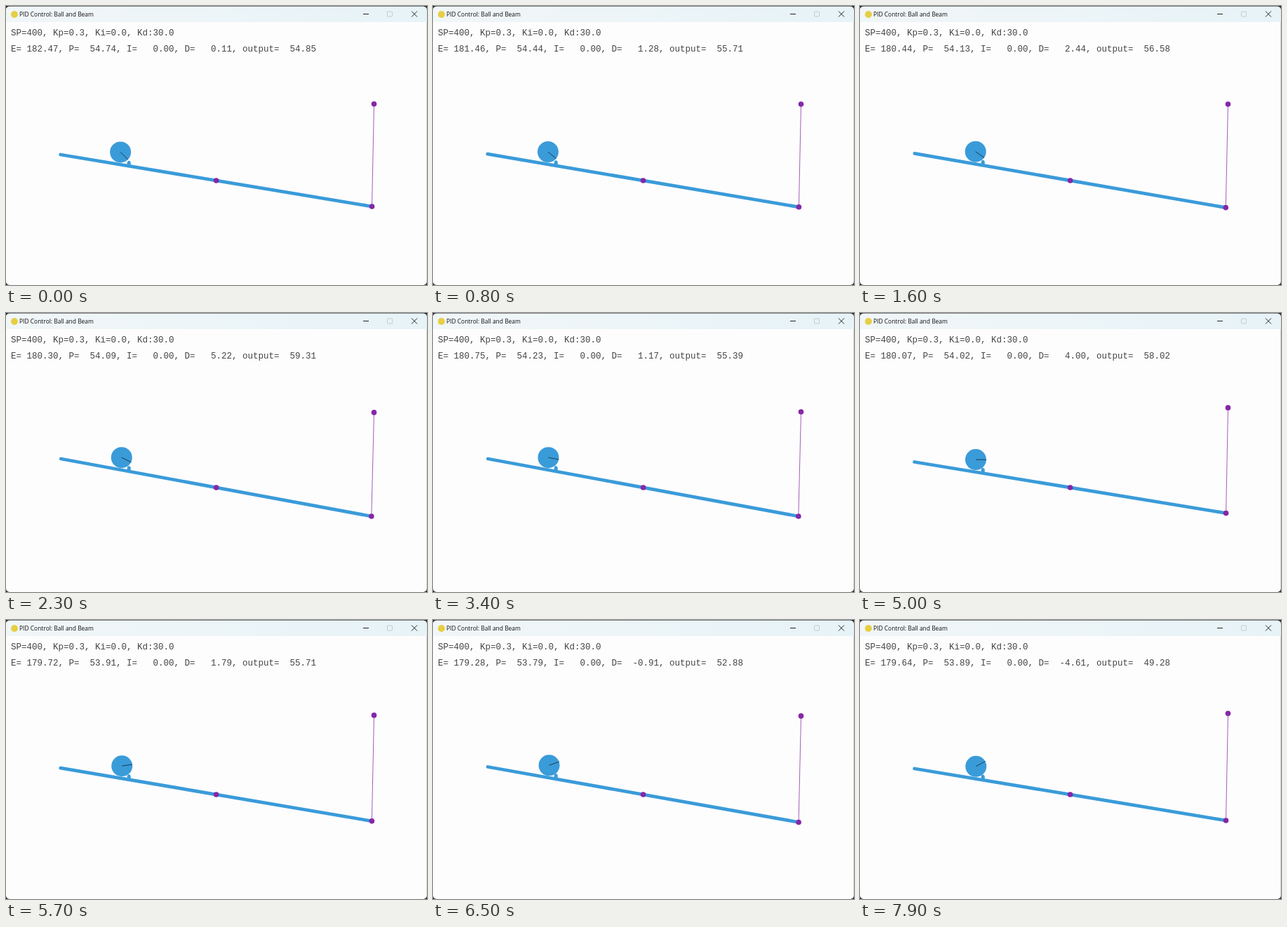
An HTML page for the animation above (8 s loop, 600 px wide and 398 px high).

```html
<!DOCTYPE html>
<html lang="en">
<head>
<meta charset="utf-8">
<title>PID Control: Ball and Beam</title>
<style>
  html, body { margin: 0; width: 100%; height: 100%; overflow: hidden; background: #2a2d2e; }
  svg { display: block; }
  .mono { font: 12.5px "Liberation Mono", monospace; fill: #444; white-space: pre; }
  .title { font: 8.45px "Open Sans", sans-serif; fill: #111; }
  .blue { fill: #3a9bd9; }
  .pin { fill: #8427a8; }
</style>
</head>
<body>
<svg width="600" height="398" viewBox="0 0 600 398">
  <defs>
    <linearGradient id="bar"><stop stop-color="#f1f6f8"/><stop offset="1" stop-color="#e7f3f7"/></linearGradient>
    <clipPath id="frame"><rect y="0.7" width="599.8" height="397.3" rx="5"/></clipPath>
  </defs>
  <g clip-path="url(#frame)">
    <rect width="600" height="398" fill="#fefdfe"/>
    <rect width="600" height="23" fill="url(#bar)"/>
  </g>
  <circle cx="12" cy="12" r="5" fill="#e6cf45"/>
  <text class="title" x="19" y="15.3">PID Control: Ball and Beam</text>
  <g fill="none" stroke="#222">
    <path d="M509 11.5h8M578 7.5l8 8m0-8l-8 8"/>
    <rect x="543.5" y="8" width="7" height="7" rx="1" stroke="#c3cbce"/>
  </g>
  <text class="mono" x="7" y="42">SP=400, Kp=0.3, Ki=0.0, Kd:30.0</text>
  <text class="mono" x="7" y="64.5" id="readout"></text>
  <line id="beam" stroke="#3a9bd9" stroke-width="4.8" stroke-linecap="round"/>
  <ellipse class="blue" id="stop" cx="175.2" rx="2.6" ry="4.2"/>
  <circle class="blue" id="ball" r="15"/>
  <line id="spoke" stroke="#1d3b50"/>
  <line id="rod" stroke="#a05fb8"/>
  <circle class="pin" cx="299.6" cy="249" r="3.8"/>
  <circle class="pin" id="tip" r="3.8"/>
  <circle class="pin" id="crank" cx="524.5" r="3.8"/>
</svg>
<script>
const LOOP = 8, STEPS_PER_SECOND = 10;
const SETPOINT = 400, KP = 0.3, SCALE = 0.75;
const PIVOT = { x: 299.6, y: 249 }, HALF = 225, CRANK_X = 524.5, RADIUS = 15;

// key poses: seconds, error, derivative term, height of the beam's right end
const poses = [
  [0, 182.47, 0.11, 286],
  [1.6, 180.443, 2.443, 287.6],
  [2.3, 180.3, 5.22, 290],
  [3.4, 180.752, 1.166, 290],
  [5, 180.07, 4, 285.5],
  [6.5, 179.284, -0.91, 288.5],
  [7.9, 179.64, -4.61, 286]
];

const set = (id, attrs) => {
  const el = document.getElementById(id);
  for (const name in attrs) el.setAttribute(name, attrs[name]);
};
const num = v => v.toFixed(2).padStart(7);

function poseAt(t) {
  const i = Math.max(1, poses.findIndex(pose => pose[0] >= t));
  const a = poses[i - 1], b = poses[i];
  const u = (t - a[0]) / (b[0] - a[0]), ease = u * u * (3 - 2 * u);
  return a.map((v, j) => v + (b[j] - v) * ease).slice(1);
}

function draw(t) {
  const [error, d, tipY] = poseAt(t);
  const p = KP * error;
  document.getElementById("readout").textContent =
    `E=${num(error)}, P=${num(p)}, I=${num(0)}, D=${num(d)}, output=${num(p + d)}`;

  const dy = tipY - PIVOT.y, dx = Math.sqrt(HALF * HALF - dy * dy);
  const beamY = x => PIVOT.y + (x - PIVOT.x) * dy / dx;
  const tipX = PIVOT.x + dx;
  set("beam", { x1: PIVOT.x - dx, y1: PIVOT.y - dy, x2: tipX, y2: tipY });
  set("stop", { cy: beamY(175) - 3.4 });
  set("tip", { cx: tipX, cy: tipY });

  // the rod stretches slowly as the crank rises
  const crankY = tipY - 146.2 - 0.83 * t;
  set("crank", { cy: crankY });
  set("rod", { x1: CRANK_X, y1: crankY, x2: tipX, y2: tipY });

  // the ball turns back steadily with a slight wobble
  const x = (SETPOINT - error) * SCALE, y = beamY(x) - 17.8;
  const angle = (45 - 10 * t + 6 * Math.sin(t * Math.PI / 3.3) ** 2) * Math.PI / 180;
  set("ball", { cx: x, cy: y });
  set("spoke", { x1: x, y1: y, x2: x + RADIUS * Math.cos(angle), y2: y + RADIUS * Math.sin(angle) });
}

const start = performance.now();
function tick() {
  const t = (performance.now() - start) / 1000 % LOOP;
  draw(Math.floor(t * STEPS_PER_SECOND) / STEPS_PER_SECOND);
  requestAnimationFrame(tick);
}
tick();
</script>
</body>
</html>
```
